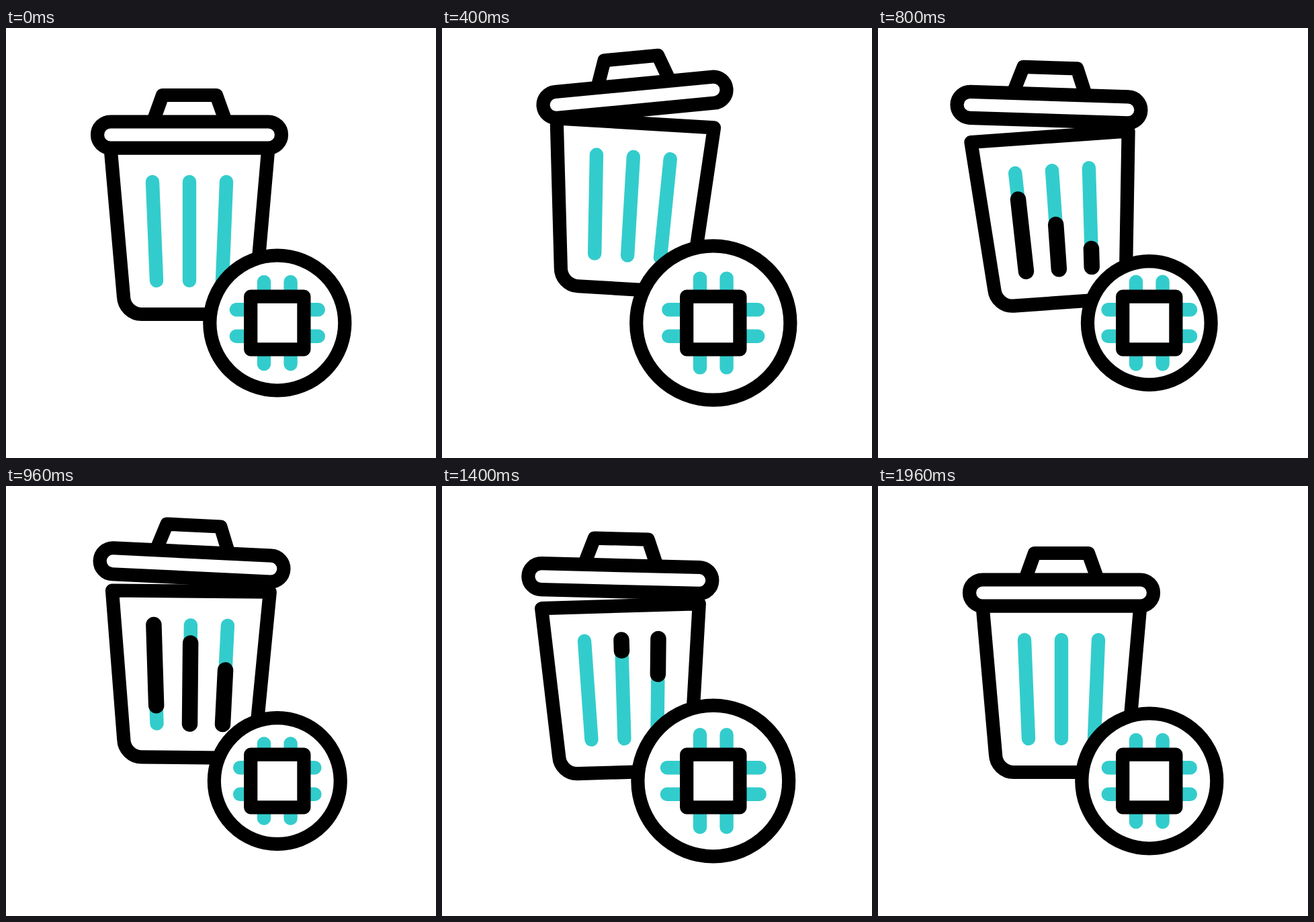
An HTML page that plays this animation: 640 by 640 pixels, repeating every 2.24 s.

```html
<!DOCTYPE html>
<html>
<head>
<meta charset="utf-8">
<style>
html, body { margin: 0; width: 100%; height: 100%; overflow: hidden; background: #fff; }
svg { display: block; width: 100%; height: 100%; }
.ink { stroke: #000; stroke-width: 20.2; fill: #fff; stroke-linejoin: round; stroke-linecap: round; }
.teal { stroke: #33cccc; stroke-width: 20.4; fill: none; stroke-linecap: round; }
.level { stroke: #000; stroke-width: 23.5; stroke-linecap: round; }
</style>
</head>
<body>
<svg viewBox="0 0 640 640">
  <g id="bin">
    <path class="ink" d="M155.6 178.5H390.4L371 400A27 27 0 0 1 344 426H202A27 27 0 0 1 175 400Z"/>
    <path class="teal" d="M218 229L224 376M273 229V376M328 229L322 376"/>
    <line class="level"/><line class="level"/><line class="level"/>
    <g id="lid">
      <path class="ink" d="M219 139L233 100H313L327 139"/>
      <rect class="ink" x="136" y="139.5" width="274" height="39" rx="19.5"/>
    </g>
  </g>
  <circle id="ring" class="ink" cx="403.8" cy="439"/>
  <path id="pins" class="teal"/>
  <rect class="ink" x="364.2" y="399.6" width="79.2" height="78.8"/>
</svg>
<script>
const $ = id => document.getElementById(id);
const levels = document.querySelectorAll('.level');

const clamp = u => Math.min(1, Math.max(0, u));
const smooth = u => u * u * (3 - 2 * u);
const ramp = (t, from, to) => smooth(clamp((t - from) / (to - from)));
const wave = (t, peak, period) => Math.cos(2 * Math.PI * (t - peak) / period);
const bell = (t, peak, half) => Math.abs(t - peak) < half ? (1 + wave(t, peak, 2 * half)) / 2 : 0;

// The wobble calms down after the first swings, then stops.
const settle = t => 1 - 0.57 * ramp(t, 800, 1100) - 0.43 * ramp(t, 1400, 1680);

const tilt = t => -4.1 * ramp(t, 0, 140) * settle(t) * wave(t, 140, 640);
const hop = t => -44 * bell(t, 320, 320) - 22 * bell(t, 940, 460);
const lidTilt = t => t < 720
  ? -9 * wave(t, 360, 1440)
  : 7.5 * settle(t) * wave(t, 860, 560);
const lidLift = t => -(19.5 + 4.8 * settle(t) * wave(t, 240, 580))
  * ramp(t, 0, 220) * (1 - ramp(t, 1640, 1960));

// Swelling around its first peak at t = 0.
const pulse = t => (2.3 + 11.8 * wave(Math.max(t, 0), 0, 910))
  * ramp(t, -370, 0) * (1 - ramp(t, 1000, 1280));

function progress(t, start) {
  const u = clamp((t - start) / 520);
  return (u + smooth(u)) / 2;
}

function drawLevel(line, i, t) {
  const start = 440 + 120 * i, lean = 6 * (1 - i);
  const head = progress(t, start), tail = progress(t, start + 400);
  const x = p => 218 + 55 * i + lean * (1 - p);
  const y = p => 376 - 147 * p;
  const attrs = { x1: x(tail), y1: y(tail), x2: x(head), y2: y(head) };
  for (const name in attrs) line.setAttribute(name, attrs[name]);
  line.style.display = t >= start && tail < 1 ? '' : 'none';
}

function place(id, lift, angle, pivot) {
  $(id).setAttribute('transform', `translate(0 ${lift}) rotate(${angle} 273 ${pivot})`);
}

function draw(t) {
  place('bin', hop(t), tilt(t), 428);
  place('lid', lidLift(t), lidTilt(t), 179);
  levels.forEach((line, i) => drawLevel(line, i, t));
  $('ring').setAttribute('r', 100.5 + pulse(t - 400));
  const r = 61 + 0.6 * pulse(t - 550);
  $('pins').setAttribute('d', [-19.8, 19.8].map(o =>
    `M${403.8 + o} ${439 - r}v${2 * r}M${403.8 - r} ${439 + o}h${2 * r}`).join(''));
}

const begin = performance.now();
function frame() {
  const t = (performance.now() - begin) % 2240;
  draw(Math.min(1960, Math.floor(t / 40) * 40));
  requestAnimationFrame(frame);
}
frame();
</script>
</body>
</html>
```
